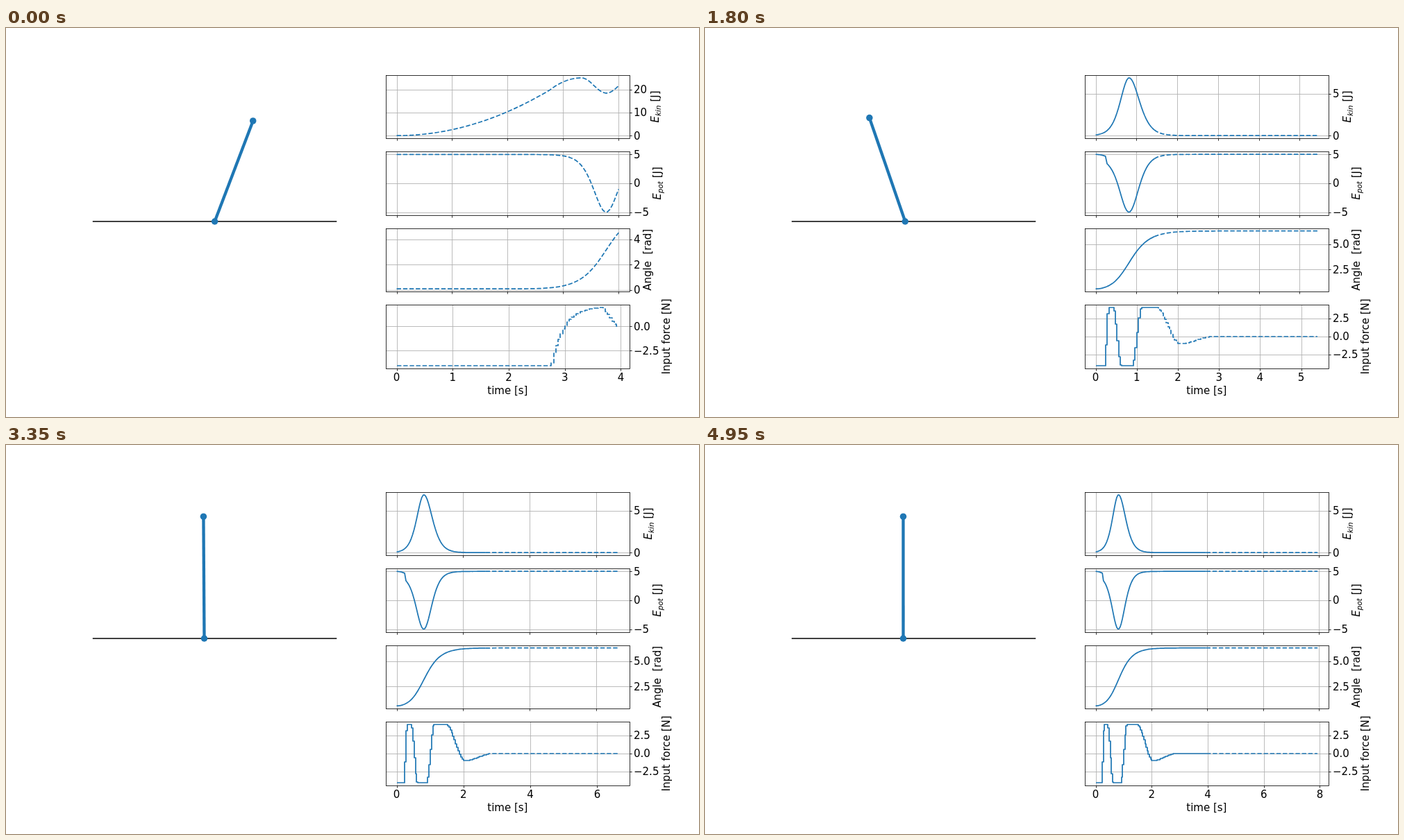
Write an HTML page that moves like this. It is 998 px wide and 561 px high and loops after 5000 ms.

```html
<!DOCTYPE html>
<html lang="en">
<head>
<meta charset="utf-8">
<title>Pendulum swing-up</title>
<style>
  html, body { margin: 0; width: 100%; height: 100%; overflow: hidden; background: #fff; }
  svg { display: block; width: 100%; height: 100%; }
  text { font: 15px "DejaVu Sans", sans-serif; white-space: pre; fill: #000; }
  .mid { text-anchor: middle; }
  .it { font-style: italic; }
  .sub { font-style: italic; font-size: 10.5px; }
  .grid { stroke: #b0b0b0; stroke-width: .85; fill: none; }
  .edge { stroke: #000; stroke-width: .8; fill: none; }
  .line { stroke: #1f77b4; stroke-width: 1.73; fill: none; stroke-linejoin: round; }
  .dash { stroke-dasharray: 6.4 2.77; }
  .track { stroke: #000; stroke-width: 1.73; }
  .pole { stroke: #1f77b4; stroke-width: 4.33; }
  .dot { fill: #1f77b4; }
</style>
</head>
<body>
<svg id="stage" viewBox="0 0 998 561"></svg>
<script>
const DT = 0.04, STEP_MS = 50, STEPS = 100, HORIZON = 4;
const LEFT = 546.6, RIGHT = 898.2, TOP = 67.6, HEIGHT = 91.8, PITCH = 110.45;
const SPAN = (RIGHT - LEFT) / 1.1, X0 = LEFT + SPAN / 20;

const { exp, cos, sin, cosh, atan, hypot, PI } = Math;
const bell = x => exp(-x * x);
const ramp = (t, a, b) => {
  const s = Math.min(Math.max((t - a) / (b - a), 0), 1);
  return s * s * (3 - 2 * s);
};
// A full turn of a free pendulum, hanging straight down at t = 0.
const swing = (t, rate) => 4 * atan(exp(rate * t));

const angle = t => t < .55 ? .6 * cosh(3.03 * t) : swing(t - .815, 3.15);

function cart(t) {
  const s = t - 1.06;
  return 285.5 + 15.1 * bell(t / .3) + 20 * bell(s / (s < 0 ? .37 : .27));
}

const swingUp = {
  curves: [
    t => 6.9 / cosh((t - .82) * (t < .82 ? 3.5 : 2.95)) ** 2,
    t => t < .26 ? 5 - .32 * (t / .24) ** 2 : 5 * cos(angle(t)),
    angle,
    t => -4 + 8 * ramp(t, .2, .3) - 8 * ramp(t, .41, .61) + 8 * ramp(t, .88, 1.1)
      - 5 * ramp(t, 1.46, 2.04) + ramp(t, 2.04, 2.85)
  ],
  limits: [[0, 6.9], [-5, 5], [.6, 6.283], [-4, 4]],
  ticks: [["0", "5"], ["−5", "0", "5"], ["2.5", "5.0"], ["−2.5", "0.0", "2.5"]]
};

const fall = t => hypot(.09, swing(t - 3.775, 3.3));

const firstPlan = {
  curves: [
    t => t < 2.76 ? 2.6 * t * t
      : t < 3.33 ? 25.05 - 5.25 * ((3.33 - t) / .57) ** 2
      : 21.75 + 3.3 * cos(PI * (t - 3.33) / .45),
    t => 5 * cos(fall(t)),
    fall,
    t => -4 + 6.05 * (1 - exp(-Math.max(t - 2.75, 0) / .22)) - 2.1 * ramp(t, 3.62, 3.96)
  ],
  limits: [[0, 25.1], [-5, 5], [.09, 4.65], [-4, 1.93]],
  ticks: [["0", "10", "20"], ["−5", "0", "5"], ["0", "2", "4"], ["−2.5", "0.0"]]
};

const energy = sub => `<tspan class="it">E</tspan><tspan class="sub" dy="2.5">${sub}</tspan><tspan dy="-2.5"> [J]</tspan>`;
const LABELS = [energy("kin"), energy("pot"), "Angle  [rad]", "Input force [N]"];

const snap = v => Math.round(v) + .5;
const seg = (cls, x1, y1, x2, y2) => `<line class="${cls}" x1="${x1}" y1="${y1}" x2="${x2}" y2="${y2}"/>`;
const dot = (x, y) => `<circle class="dot" cx="${x}" cy="${y}" r="4.75"/>`;
const textWidth = s => 15 * [...s].reduce((w, c) => w + (c === "." ? .318 : c === "−" ? .838 : .636), 0);

function path(f, from, to, x, y, stepped, cls) {
  let d = "";
  for (let k = from; k <= to; k++) {
    const [px, py] = [x(k * DT), y(f(k * DT))].map(v => stepped ? Math.round(v) : v.toFixed(2));
    d += !d ? `M${px} ${py}` : stepped ? `H${px}V${py}` : `L${px} ${py}`;
  }
  return to > from ? `<path class="${cls}" d="${d}"/>` : "";
}

function plot(i, k, plan) {
  const stepped = i === 3, top = TOP + i * PITCH, bottom = top + HEIGHT;
  const last = k + HORIZON / DT - (stepped ? 1 : 0), end = last * DT;
  const [lo, hi] = plan.limits[i];
  const x = t => X0 + SPAN * t / end;
  const y = v => bottom - HEIGHT / 22 - (v - lo) / (hi - lo) * HEIGHT / 1.1;
  const l = snap(LEFT), r = snap(RIGHT), t = snap(top), b = snap(bottom);
  let out = "", marks = "", widest = 0;

  const gap = end * 1.1 / 7 > 1 ? 2 : 1;
  for (let s = 0; s <= end * 1.05; s += gap) {
    const px = snap(x(s));
    out += seg("grid", px, t, px, b);
    marks += seg("edge", px, b, px, b + 3.2);
    if (stepped) marks += `<text class="mid" x="${x(s)}" y="509">${s}</text>`;
  }
  for (const s of plan.ticks[i]) {
    const v = y(+s.replace("−", "-")), py = snap(v);
    out += seg("grid", l, py, r, py);
    marks += seg("edge", r, py, r + 3.2, py) + `<text x="904" y="${Math.round(v + 5.5)}">${s}</text>`;
    widest = Math.max(widest, textWidth(s));
  }

  out += path(swingUp.curves[i], 0, k, x, y, stepped, "line");
  const f = plan.curves[i];
  const ahead = plan === firstPlan ? s => f(s - k * DT) : f;
  out += path(ahead, k, last, x, y, stepped, "line dash");

  out += `<rect class="edge" x="${l}" y="${t}" width="${r - l}" height="${b - t}"/>`;
  const lx = Math.round(904 + widest + (i < 2 ? 16.5 : 15.5)), ly = top + HEIGHT / 2;
  return out + marks + `<text class="mid" transform="translate(${lx} ${ly}) rotate(-90)">${LABELS[i]}</text>`;
}

function pendulum(t) {
  const x = cart(t), y = 279, a = angle(t);
  const tx = x + 97.6 * sin(a), ty = y - 175.8 * cos(a);
  return seg("track", 124.8, y, 476.3, y) + seg("pole", x, y, tx, ty) + dot(x, y) + dot(tx, ty);
}

const stage = document.getElementById("stage");
let shown = -1;

function draw(k) {
  const plan = k < 4 ? firstPlan : swingUp;
  stage.innerHTML = pendulum(k * DT) + LABELS.map((_, i) => plot(i, k, plan)).join("")
    + `<text class="mid" x="722.4" y="528">time [s]</text>`;
}

function tick() {
  const k = Math.floor(performance.now() / STEP_MS) % STEPS;
  if (k !== shown) draw(shown = k);
  requestAnimationFrame(tick);
}
tick();
</script>
</body>
</html>
```
